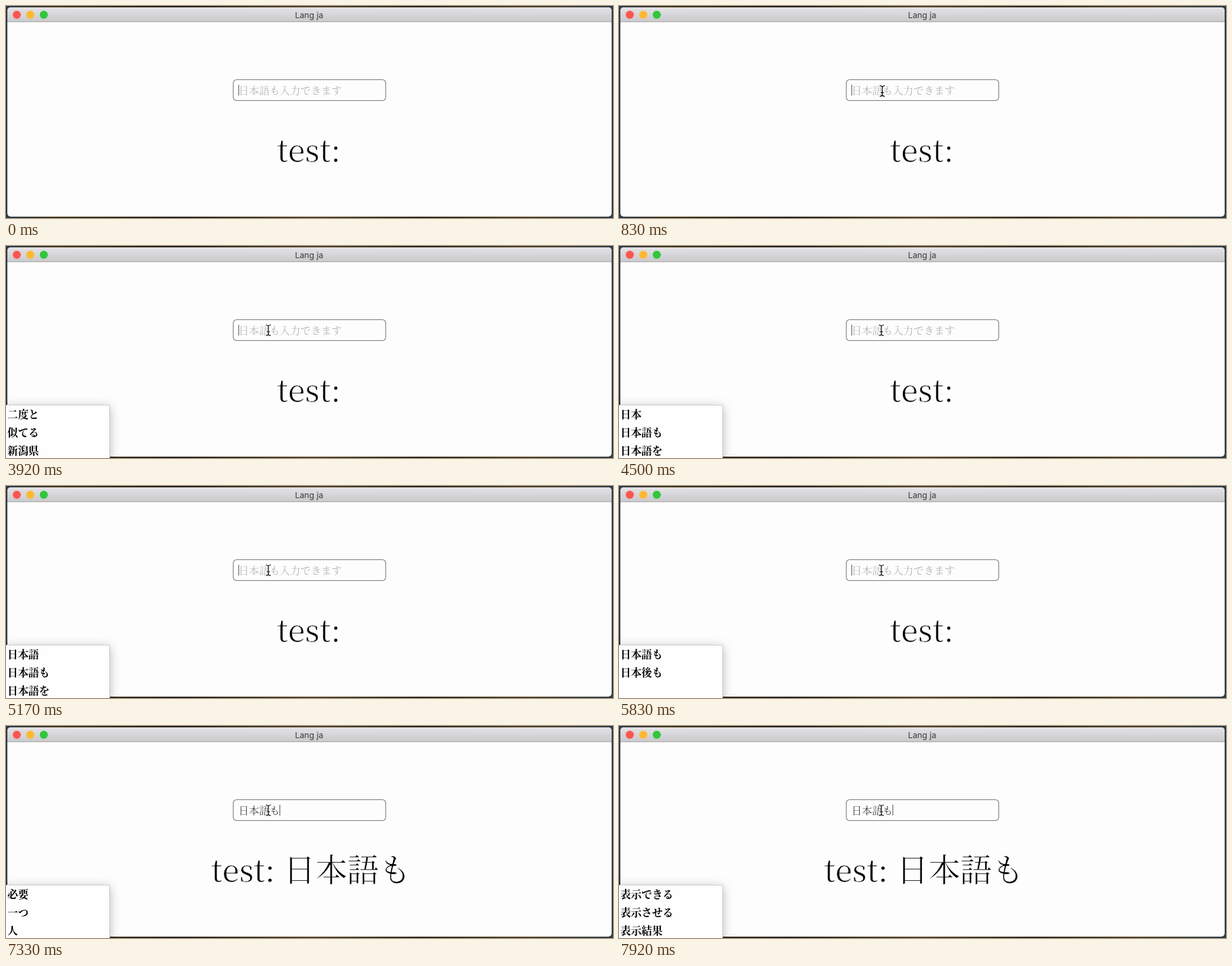
An HTML page that plays this animation: 900 px wide and 315 px high, repeating every 8 s.

```html
<!DOCTYPE html>
<html lang="ja">
<head>
<meta charset="utf-8">
<title>Lang ja</title>
<style>
  html, body { margin: 0; width: 100%; height: 100%; overflow: hidden; }
  #stage {
    position: relative; width: 900px; height: 315px; overflow: hidden;
    background: linear-gradient(90deg, #2c3c4c, #41371c 8%, #211f18 28%, #54462a 50%, #2a271c 68%, #4e4226 86%, #2e3c48);
  }
  #window {
    position: absolute; left: 2px; top: 2px; width: 896px; height: 311px;
    border-radius: 5px; overflow: hidden; background: #fdfdfd;
  }
  #bar {
    height: 21px; border-bottom: 1px solid #acacac;
    background: linear-gradient(#e3e2e4, #cac9cb);
  }
  svg { position: absolute; inset: 0; }
  text { white-space: pre; }
  .title { font: 12.3px Inter, sans-serif; fill: #3c3c3c; }
  .serif { font-family: "Noto Serif CJK JP", "Noto Serif JP", "Noto Serif", "Noto Sans CJK JP", serif; font-weight: 300; }
  .field { font-size: 15.3px; }
  /* the outline in the page colour gives a lighter weight */
  .big { fill: #000; stroke: #fdfdfd; stroke-width: .6; }
  #label { font-size: 45.6px; }
  #echo { font-size: 47.2px; }
  #popup {
    position: absolute; left: -6px; top: 237px; width: 159px; height: 90px;
    box-sizing: border-box; padding-left: 8px; background: #fefefe;
    box-shadow: 0 0 0 1px #d0d0d0, 0 3px 14px 1px rgba(0, 0, 0, .28);
    font-size: 15.7px; font-weight: 900; line-height: 27px; color: #000;
  }
  #popup div { height: 27px; position: relative; top: -1px; white-space: nowrap; }
</style>
</head>
<body>
<div id="stage">
  <div id="window"><div id="bar"></div></div>
  <svg width="900" height="315" viewBox="0 0 900 315">
    <circle cx="16" cy="13" r="6" fill="#fc5650"/>
    <circle cx="36" cy="13" r="6" fill="#fdb934"/>
    <circle cx="56" cy="13" r="6" fill="#2fc73c"/>
    <text class="title" x="449.5" y="18" text-anchor="middle">Lang ja</text>
    <rect x="337" y="109.5" width="226" height="31" rx="5" fill="#fdfdfd" stroke="#7c7c7c" stroke-width="1.1"/>
    <text id="field" class="serif field" x="344.8" y="130.5"></text>
    <rect id="caret" y="117" width="1" height="16" fill="#4c4c4c"/>
    <text id="label" class="serif big" y="231" text-anchor="middle">test:</text>
    <text id="echo" class="serif big" x="411.5" y="231">日本語も</text>
  </svg>
  <div id="popup" class="serif"><div></div><div></div><div></div></div>
  <svg width="900" height="315" viewBox="0 0 900 315">
    <defs>
      <path id="beamShape" d="M-3.3-7.5Q-.3-7.5 0-5.5Q.3-7.5 3.3-7.5M0-5.5V6M-1.8 2.5H1.8M-3.3 8Q-.3 8 0 6Q.3 8 3.3 8"/>
    </defs>
    <g id="pointer" stroke-linecap="round" stroke-linejoin="round">
      <g id="beam" fill="none">
        <use href="#beamShape" stroke="#fff" stroke-width="2.4"/>
        <use href="#beamShape" stroke="#000" stroke-width="1.2"/>
      </g>
      <path id="arrow" d="M0 0V15L3.5 12L6 17.5L8.5 16.5L6 11H10.5Z" fill="#000" stroke="#fff"/>
    </g>
  </svg>
</div>
<script>
const LOOP = 8000, STEP = 1000 / 12;
const $ = id => document.getElementById(id);
const rows = [...$("popup").children];

// [start ms, candidates separated by spaces]
const lists = [
  [0, ""],
  [3750, "二度と 似てる 新潟県"],
  [4250, "日本 日本の 日本語"],
  [4420, "日本 日本語も 日本語を"],
  [5080, "日本語 日本語も 日本語を"],
  [5500, "日本語も 日本後も"],
  [6000, ""],
  [7330, "必要 一つ 人"],
  [7500, "表示 表現 評価"],
  [7660, "表 表示 表現"],
  [7750, "表示できる 表示させる 表示結果"]
];
const COMMIT = 6000;
const MOVE = [80, 1000], FROM = [620, 325], TO = [389, 125];

const show = (id, on) => { $(id).style.display = on ? "" : "none"; };

function drawPointer(t) {
  const frame = Math.floor((t + 4) / STEP) * STEP;
  const p = Math.min(1, Math.max(0, (frame - MOVE[0]) / (MOVE[1] - MOVE[0])));
  const ease = 1 - (1 - p) ** 3;
  const [x, y] = FROM.map((a, i) => a + (TO[i] - a) * ease);
  const inside = x > 337 && x < 563 && y > 109 && y < 141;
  $("pointer").setAttribute("transform", `translate(${x} ${y})`);
  show("pointer", t >= MOVE[0]);
  show("beam", inside);
  show("arrow", !inside);
}

function draw(t) {
  const done = t >= COMMIT;
  $("field").textContent = done ? "日本語も" : "日本語も入力できます";
  $("field").setAttribute("fill", done ? "#444" : "#b4b4b4");
  $("caret").setAttribute("x", done ? 405.5 : 344.5);
  $("label").setAttribute("x", done ? 351.5 : 449);
  show("echo", done);

  const words = lists.filter(([start]) => t >= start).pop()[1].split(" ");
  show("popup", words[0]);
  rows.forEach((row, i) => { row.textContent = words[i] || ""; });
  drawPointer(t);
}

const begin = performance.now();
function tick() {
  draw((performance.now() - begin) % LOOP);
  requestAnimationFrame(tick);
}
tick();
</script>
</body>
</html>
```
